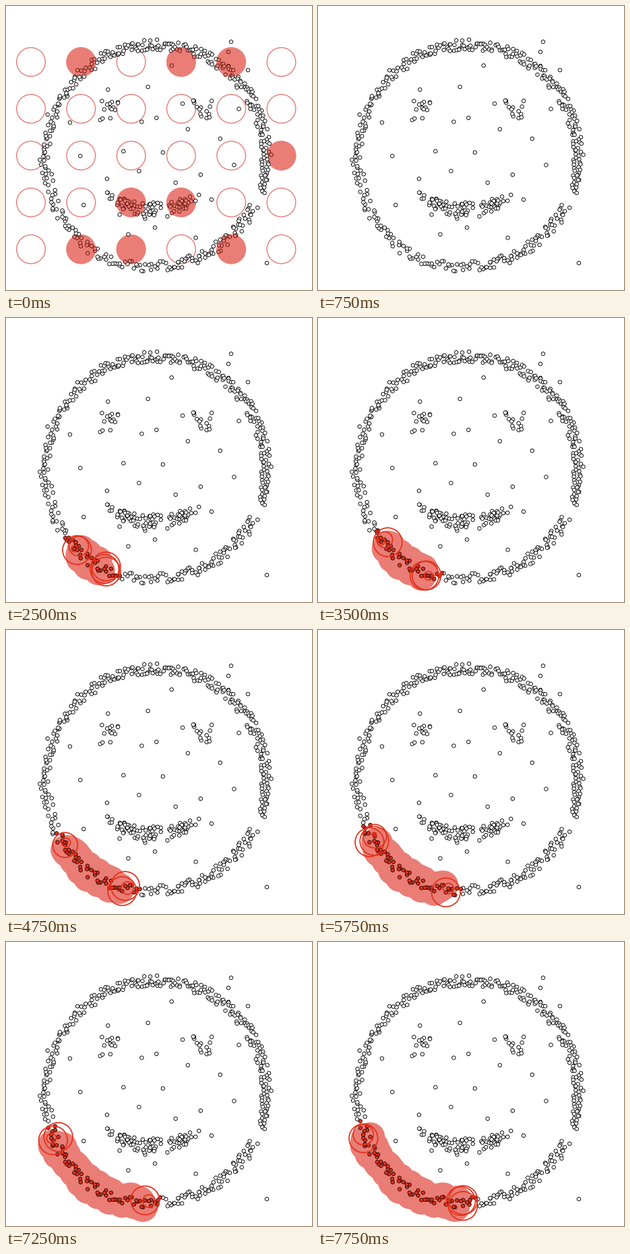
Recreate the animation shown at these times as a matplotlib script. Size 454x421 px, loop 8 s.

```python
import numpy as np
import matplotlib.pyplot as plt
from matplotlib.animation import FuncAnimation
from matplotlib.collections import EllipseCollection

W, H, DPI = 454, 421, 100
STEP, FRAMES = 250, 32
EPS = 21.3
PREVIEW = 500                  # ms the grid of discs is shown
GROW, HOLD = 300, 700          # ms until a ring is full size / becomes a disc
RED, PINK, DARK, BLACK = "#e5301a", "#ea7d75", "#64110c", "#000000"
CENTER, RADIUS = np.array([222, 221]), 164
rng = np.random.default_rng(11)


def polar(degrees, radius):
    a = np.radians(degrees)
    return CENTER + np.c_[radius * np.cos(a), radius * np.sin(a)]


def arc(start, end, count):
    """Head outline: evenly spread angles with jitter in both directions."""
    slot = (end - start) / count
    angle = start + slot * (np.arange(count) + rng.uniform(-0.5, 1.5, count))
    return polar(angle, RADIUS + rng.uniform(-8, 8, count))


def eye(x, y, count=13):
    return np.array([x, y]) + rng.uniform(-14, 14, (count, 2))


def smile(count=82):
    u = 2 * rng.beta(1.3, 1.3, count) - 1
    spread = (13 - 10 * u**2) * rng.uniform(-1, 1, count)
    return np.c_[220 + 72 * u, 304 - 27 * u**2 + spread]


def strays(count=28):
    """Isolated points, sunflower-spaced over the inside of the face."""
    k = np.arange(count)
    inside = polar(137.5 * k, 140 * np.sqrt((k + 0.5) / count))
    inside += rng.normal(0, 7, inside.shape)
    return np.vstack([inside, [(334, 53), (330, 68), (359, 95), (387, 381)]])


# The cluster starts on the chin and spreads both ways along the outline.
CHIN_COUNT = 72
u = (np.arange(CHIN_COUNT) + 0.5) / CHIN_COUNT
chin_angle = 86 + 76 * u + rng.uniform(-0.6, 0.6, CHIN_COUNT)
chin_radius = RADIUS + 6 * np.sin(np.pi * u) + rng.uniform(-7, 7, CHIN_COUNT)
CHIN = polar(chin_angle, chin_radius)
STARTS = np.interp(abs(chin_angle - 124.5), [0, 4.5, 38], [860, 1100, 8700])

POINTS = np.vstack([strays(), eye(156, 153), eye(291, 153), smile(),
                    arc(-196, -120, 76), arc(-120, 20, 198),
                    arc(27, 85, 68), CHIN])

GRID = np.array([(37 + 74.3 * col, 83 + 69.4 * row)
                 for row in range(5) for col in range(6)])
FILLED = [1, 3, 4, 17, 20, 21, 25, 26, 28]


def near(centers):
    gap = POINTS[:, None] - centers[None]
    return (np.hypot(gap[..., 0], gap[..., 1]) <= EPS).any(axis=1)


fig = plt.figure(figsize=(W / DPI, H / DPI), dpi=DPI, facecolor="white")
ax = fig.add_axes([0, 0, 1, 1])
ax.set(xlim=(0, W), ylim=(H, 0))
ax.axis("off")


def circles(centers, radii, **style):
    if len(centers) == 0:
        return
    size = 2 * np.broadcast_to(radii, len(centers))
    ax.add_collection(EllipseCollection(
        size, size, np.zeros(len(centers)), units="xy", offsets=centers,
        offset_transform=ax.transData, **style), autolim=False)


def draw(i):
    for group in list(ax.collections):
        group.remove()
    t = i * STEP

    if t < PREVIEW:
        discs, rings, radii = GRID[FILLED], GRID, EPS
        ring_style = dict(edgecolors="#e6817b", linewidths=1.05, zorder=1)
        marked, fill, edge = near(discs), PINK, DARK
    else:
        age = t - STARTS
        active = (age > 0) & (age < HOLD)
        discs, rings = CHIN[age >= HOLD], CHIN[active]
        radii = EPS * np.minimum(1, age[active] / GROW)
        ring_style = dict(edgecolors=RED, linewidths=1.25, zorder=4)
        marked, fill, edge = near(CHIN[age > 0]), RED, "#2a0806"

    circles(discs, EPS + 0.4, facecolors=PINK, edgecolors="none", zorder=0)
    circles(rings, radii, facecolors="none", **ring_style)
    circles(POINTS, 2.7, linewidths=0.65, zorder=3,
            facecolors=np.where(marked, fill, "#ffffff"),
            edgecolors=np.where(marked, edge, BLACK))
    return ax.collections


anim = FuncAnimation(fig, draw, frames=FRAMES, init_func=lambda: draw(0),
                     interval=STEP, repeat=True, repeat_delay=0, blit=False)
plt.show()
```
